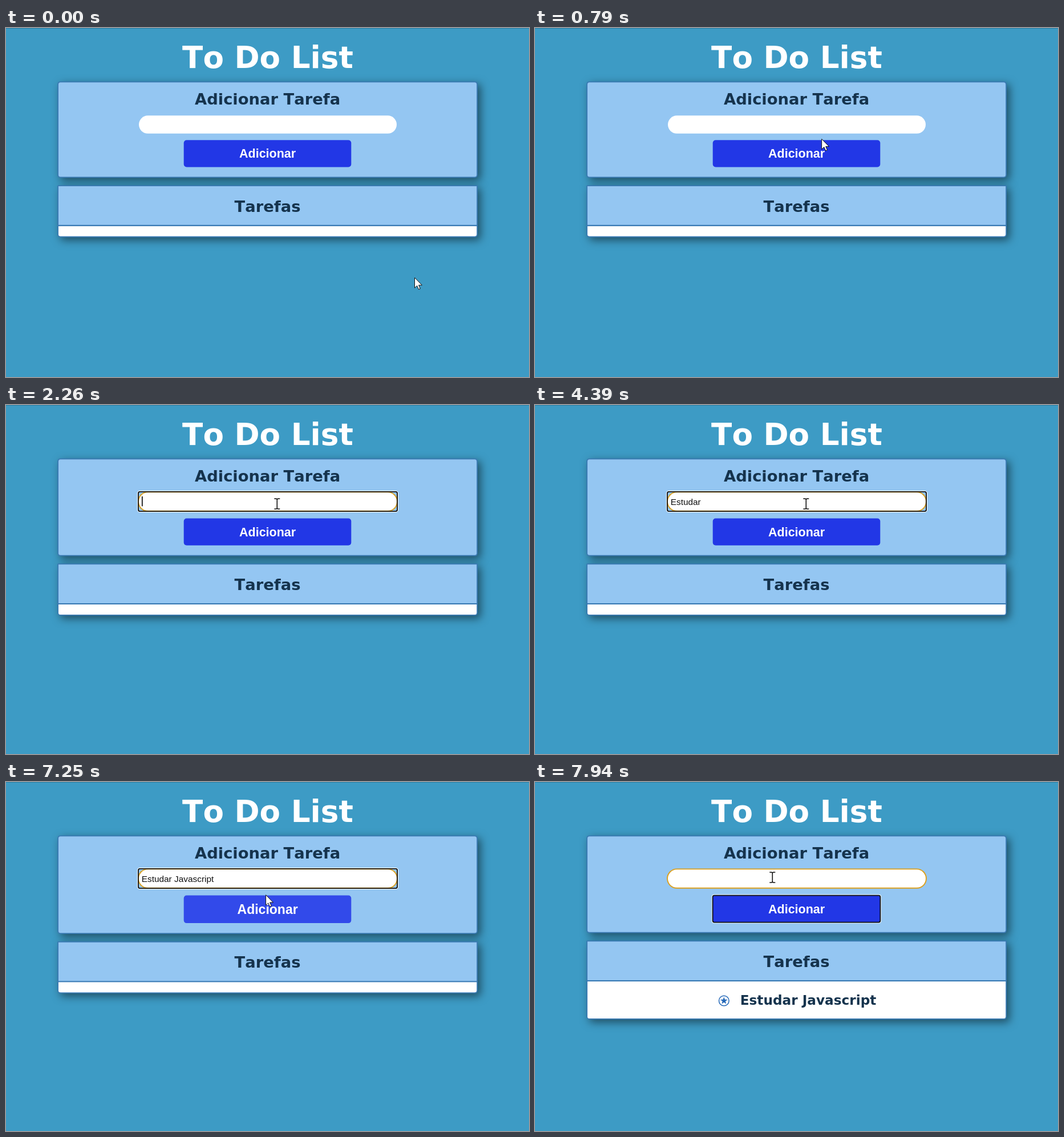
An HTML page with a canvas for the animation above (8000 ms loop, 917 by 611 pixels).

```html
<!DOCTYPE html>
<html lang="pt">
<head>
<meta charset="utf-8">
<title>To Do List</title>
<style>
html, body { margin: 0; width: 100%; height: 100%; overflow: hidden; background: #3d9bc5; }
canvas { display: block; }
</style>
</head>
<body>
<canvas id="stage" width="917" height="611"></canvas>
<script>
const ctx = document.getElementById('stage').getContext('2d');
const LOOP = 8000;
const HEAD = '"DejaVu Sans", Verdana, sans-serif';
const BODY = '"Liberation Sans", Arial, sans-serif';
const INK = '#15334d', PANEL = '#94c6f2', EDGE = '#3a7ab3', GOLD = '#dba122';
const MID = 458.6;
const TASK = 'Estudar Javascript';

const FOCUS = 1190, LEAVE = 7020, PRESS = 7480, RELEASE = 7630, BLINK = 535;
const START = [716, 437], FIELD = [475, 173], BUTTON = [446, 209], END = [416, 167];

// typing bursts: start, gap between keys, number of keys
const BURSTS = [[2580, 150, 2], [3050, 158, 6], [4580, 190, 2], [5080, 210, 5], [6150, 160, 3]];
const KEYS = BURSTS.flatMap(([start, gap, n]) =>
  Array.from({ length: n }, (_, i) => start + gap * i));

const between = (v, a, b) => v >= a && v < b;

function glide(a, b, t, t0, dur) {
  const u = Math.min(1, Math.max(0, (t - t0) / dur));
  return a + (b - a) * (1 - Math.cos(Math.PI * u)) / 2;
}

// The pointer is sampled in short steps while it moves.
function stepTime(t) {
  const hold = (t0, step) => t0 + step * Math.floor((t - t0) / step);
  if (t < 70) return 0;
  if (t < FOCUS) return hold(70, 80);
  return t < LEAVE ? t : hold(LEAVE, 76.6);
}

function pointerAt(t) {
  // x settles a little later than y, which bends the first move
  if (t < LEAVE) return [0, 1].map(i => glide(START[i], FIELD[i], t, 0, [1010, 967][i]));
  if (t < RELEASE) return [0, 1].map(i => glide(FIELD[i], BUTTON[i], t, 6970, 450));
  return [0, 1].map(i => glide(BUTTON[i], END[i], t, 7660, 280));
}

function box(x, y, w, h, r, fill) {
  ctx.beginPath();
  ctx.roundRect(x, y, w, h, r);
  ctx.fillStyle = fill;
  ctx.fill();
}

function outline(x, y, w, h, r, width, color) {
  ctx.beginPath();
  ctx.roundRect(x, y, w, h, r);
  ctx.lineWidth = width;
  ctx.strokeStyle = color;
  ctx.stroke();
}

function text(str, x, y, font, color, align = 'center') {
  ctx.font = font;
  ctx.textAlign = align;
  ctx.fillStyle = color;
  ctx.fillText(str, x, y);
}

function panel(y, h, radii) {
  ctx.save();
  ctx.shadowColor = 'rgba(0,0,0,.5)';
  ctx.shadowBlur = 15;
  ctx.shadowOffsetX = ctx.shadowOffsetY = 5;
  box(90.2, y, 736.8, h, radii, EDGE);
  ctx.restore();
  box(92, y + 1.8, 733.2, h - 3.6, radii.map(r => Math.max(0, r - 1.5)), PANEL);
}

function ring(x, y, w, h, r) {
  outline(x - 0.5, y - 0.5, w + 1, h + 1, r + 0.5, 1, '#fff');
  outline(x + 0.9, y + 0.9, w - 1.8, h - 1.8, r, 1.8, '#101010');
}

function field(t, active, focused) {
  if (active) box(231, 151.4, 456, 35.4, 17.7, GOLD);
  box(233, 153.3, 452, 31.5, 15.7, '#fff');
  if (focused) ring(231, 151, 456, 36, 3);

  const n = t < RELEASE ? KEYS.filter(k => k <= t).length : 0;
  const typed = TASK.slice(0, n);
  text(typed, 237.7, 174.5, '15.4px ' + BODY, '#111', 'left');
  const last = n ? KEYS[n - 1] : FOCUS;
  if (focused && (t - last) % (2 * BLINK) < BLINK) {
    ctx.fillStyle = '#000';
    ctx.fillRect(238 + ctx.measureText(typed).width, 160, n ? 1 : 1.6, 17.3);
  }
}

function button(y, h, hover, focused) {
  box(311.7, y, 293.6, h, 5, hover ? '#324aea' : '#2237e6');
  if (focused) ring(310.7, y - 0.8, 295.6, h + 1.6, 3);
  text('Adicionar', MID, y + h / 2 + (hover ? 8.2 : 7.5),
    `bold ${hover ? 23 : 21.5}px ${BODY}`, '#fff');
}

function starBullet(x, y) {
  ctx.beginPath();
  ctx.arc(x, y, 8.8, 0, 7);
  ctx.lineWidth = 1.5;
  ctx.strokeStyle = ctx.fillStyle = '#2468b8';
  ctx.stroke();
  ctx.beginPath();
  for (let i = 0; i < 10; i++) {
    const r = i % 2 ? 2.7 : 6.8, a = i * Math.PI / 5;
    ctx.lineTo(x + r * Math.sin(a), y - r * Math.cos(a));
  }
  ctx.fill();
}

function list(y, hasTask) {
  const h = hasTask ? 138.2 : 91.2;
  panel(y, h, [1, 1, 5, 5]);
  text('Tarefas', MID, y + 46.5, 'bold 27.4px ' + HEAD, INK);
  ctx.fillStyle = EDGE;
  ctx.fillRect(91, y + 69.5, 735, 2.2);
  box(92, y + 71.7, 733.2, h - 73.5, [0, 0, 3.5, 3.5], '#fff');
  if (hasTask) {
    starBullet(331.3, y + 105.5);
    text(TASK, 479, y + 112.5, 'bold 23.2px ' + HEAD, INK);
  }
}

function arrow(x, y) {
  ctx.save();
  ctx.translate(x + 0.5, y);
  const shape = new Path2D('M0 0V18L4.2 14.2 7 20.6 9.8 19.4 7.1 13.2H12.9Z');
  ctx.fillStyle = '#fff';
  ctx.fill(shape);
  ctx.lineWidth = 1;
  ctx.strokeStyle = '#111';
  ctx.stroke(shape);
  ctx.restore();
}

function beam(x, y) {
  ctx.beginPath();
  for (const s of [-1, 1]) {
    ctx.moveTo(x - 5, y + 9 * s);
    ctx.lineTo(x - 1.5, y + 9 * s);
    ctx.lineTo(x, y + 8 * s);
    ctx.lineTo(x + 1.5, y + 9 * s);
    ctx.lineTo(x + 5, y + 9 * s);
  }
  ctx.moveTo(x, y - 8);
  ctx.lineTo(x, y + 8);
  ctx.lineWidth = 1.6;
  ctx.strokeStyle = '#111';
  ctx.stroke();
}

function draw(t) {
  const [mx, my] = pointerAt(stepTime(t));
  const overField = between(mx, 232, 686) && between(my, 152, 185.5);
  const overButton = between(mx, 312, 605) && between(my, 196.5, 244);
  const focused = between(t, FOCUS, PRESS);
  const active = focused || overField;
  const push = active ? 2.3 : 0;
  const grow = overButton ? 1.4 : 0;

  ctx.fillStyle = '#3d9bc5';
  ctx.fillRect(0, 0, 917, 611);
  ctx.fillStyle = '#2d7d9f';
  ctx.fillRect(0, 0, 917, 1);

  text('To Do List', MID + 0.4, 70, 'bold 53.2px ' + HEAD, '#fff');
  panel(93.4, 168.9 + push + grow, [5, 5, 5, 5]);
  text('Adicionar Tarefa', MID, 133.7, 'bold 27.4px ' + HEAD, INK);
  field(t, active, focused);
  button(196.2 + push, 47.2 + grow, overButton, t >= PRESS);
  list(275.2 + push + grow, t >= RELEASE);

  if (overField) beam(mx + 0.3, my); else arrow(mx, my);
  if (between(t, FOCUS, 1340) || between(t, PRESS, RELEASE)) {
    ctx.beginPath();
    ctx.arc(mx - 0.5, my + (overField ? 0 : 2), 14, 0, 7);
    ctx.fillStyle = 'rgba(255,235,0,.5)';
    ctx.fill();
  }
}

ctx.fontKerning = 'none';

function tick() {
  draw(performance.now() % LOOP);
  requestAnimationFrame(tick);
}
tick();
</script>
</body>
</html>
```
